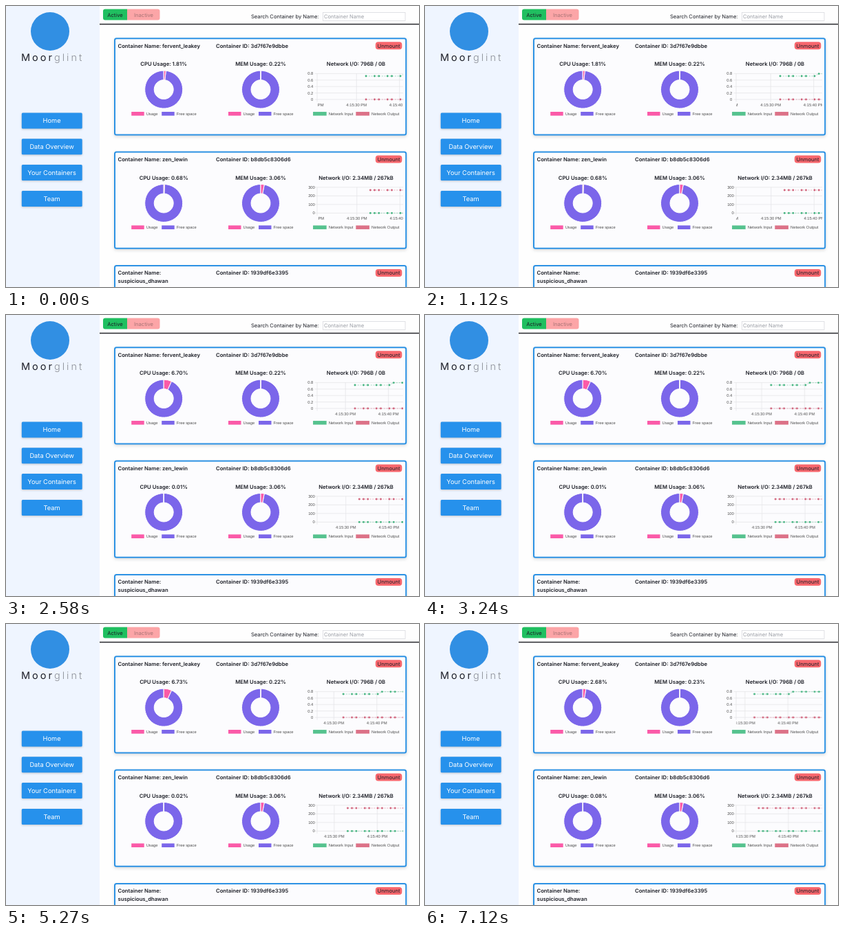
An HTML page that plays this animation: 600x409 px, repeating every 7.18 s.

```html
<!DOCTYPE html>
<html lang="en">
<head>
<meta charset="utf-8">
<title>Container dashboard</title>
<style>
  html, body { margin: 0; width: 100%; height: 100%; overflow: hidden; background: #fefefe; }
  svg { display: block; width: 600px; height: 409px; }
  text { font: 400 7.6px Inter, sans-serif; fill: #1c1e26; text-rendering: geometricPrecision; }
  .mid { text-anchor: middle; }
  .end { text-anchor: end; }
  .bold { font-weight: 600; font-size: 7.7px; }
  .nav { font-size: 9.3px; fill: #fff; text-anchor: middle; }
  .brand { font-size: 14.5px; letter-spacing: 3px; }
  .thin { font-weight: 300; fill: #8d9097; }
  .small { font: 5.8px "Liberation Sans", Arial, sans-serif; fill: #505050; }
  .hint { fill: #9a9da5; }
  .off { fill: #a87476; }
  .button { fill: #2691ec; filter: drop-shadow(0 1px 1.5px #0003); }
  .card { fill: #fcfcfe; stroke: #2c92e4; stroke-width: 2; filter: drop-shadow(0 2px 2px #0002); }
  .grid { stroke: #e3e3e6; stroke-width: .7; fill: none; }
  .slice { stroke: #fff; stroke-width: 1; }
  .line { fill: none; stroke-width: .9; stroke-dasharray: 2 1.8; opacity: .6; }
  .scroll { animation: scroll 7180ms linear infinite; }
  @keyframes scroll { to { transform: translateX(-44.875px); } }
</style>
</head>
<body>
<svg id="stage" viewBox="0 0 600 409">
  <defs>
    <clipPath id="window"><rect x="452.2" y="90" width="124.6" height="60"/></clipPath>
  </defs>
  <rect width="136" height="409" fill="#eff5ff"/>
  <circle cx="64" cy="37" r="28" fill="#318fe3"/>
  <text class="brand" x="22" y="79.5">Moor<tspan class="thin">glint</tspan></text>
  <g id="nav"></g>

  <path d="M136 26.5H600" stroke="#25262b" stroke-width="1.5"/>
  <path d="M176 4.5H144a3 3 0 0 0-3 3V17.5a3 3 0 0 0 3 3H176Z" fill="#20bf60"/>
  <path d="M176 4.5H220.5a3 3 0 0 1 3 3V17.5a3 3 0 0 1-3 3H176Z" fill="#fca5a7"/>
  <text class="mid" x="158.5" y="15.5">Active</text>
  <text class="mid off" x="200" y="15.5">Inactive</text>
  <text x="356" y="18.2">Search Container by Name:</text>
  <rect x="460.5" y="9.5" width="119.5" height="12" fill="#fff" stroke="#d9dadf" stroke-width=".8"/>
  <text class="hint" x="462" y="18.2">Container Name</text>
  <g id="cards"></g>
</svg>
<script>
const LOOP = 7180, PITCH = 165.4;
const PINK = '#fb5aa8', PURPLE = '#7b66ea', GREEN = '#55c28e', RED = '#dc7187';
const byId = id => document.getElementById(id);

function add(parent, tag, attrs = {}, content = '') {
  const el = document.createElementNS('http://www.w3.org/2000/svg', tag);
  for (const key in attrs) el.setAttribute(key, attrs[key]);
  el.textContent = content;
  parent.append(el);
  return el;
}
const label = (parent, x, y, content, cls = '') =>
  add(parent, 'text', { x, y, class: cls }, content);

['Home', 'Data Overview', 'Your Containers', 'Team'].forEach((name, i) => {
  const y = 155.4 + i * 37.85;
  add(byId('nav'), 'rect', { class: 'button', x: 22.8, y, width: 87.9, height: 23, rx: 1.5 });
  label(byId('nav'), 66.6, y + 15, name, 'nav');
});

function makeCard(i, nameLines, id) {
  const card = add(byId('cards'), 'g', { transform: `translate(0 ${i * PITCH})` });
  add(card, 'rect', { class: 'card', x: 158, y: 47.2, width: 423.2, height: 140.2, rx: 2.5 });
  nameLines.forEach((line, n) => label(card, 162.5, 60.7 + n * 11.7, line, 'bold'));
  label(card, 305, 60.7, 'Container ID: ' + id, 'bold');
  add(card, 'rect', { x: 536.8, y: 52.2, width: 38.5, height: 11, rx: 4, fill: '#f7676d' });
  label(card, 556, 60.6, 'Unmount', 'mid');
  return card;
}

function legend(card, x, width, color, name) {
  add(card, 'rect', { x, y: 154, width, height: 5.6, fill: color });
  label(card, x + width + 3, 158.8, name, 'small');
}

function slicePath(cx, from, to) {
  const at = (r, turn) => {
    const a = turn * 2 * Math.PI;
    return `${cx + r * Math.sin(a)} ${121.6 - r * Math.cos(a)}`;
  };
  const big = to - from > .5 ? 1 : 0;
  return `M${at(27.5, from)}A27.5 27.5 0 ${big} 1 ${at(27.5, to)}` +
         `L${at(14, to)}A14 14 0 ${big} 0 ${at(14, from)}Z`;
}

// steps: [time, percent] pairs; each change eases in over one second
function makeGauge(card, cx, name, steps) {
  const title = label(card, cx, 87.2, '', 'mid bold');
  const free = add(card, 'path', { class: 'slice', fill: PURPLE });
  const used = add(card, 'path', { class: 'slice', fill: PINK });
  legend(card, cx - 47, 18.5, PINK, 'Usage');
  legend(card, cx - 3, 18.5, PURPLE, 'Free space');
  return t => {
    const k = steps.findLastIndex(step => t >= step[0]);
    const [since, value] = steps[k];
    const before = k ? steps[k - 1][1] : value;
    const left = Math.max(0, 1 - (t - since) / 1000);
    const share = (value + (before - value) * left ** 4) / 100;
    title.textContent = `${name} Usage: ${value.toFixed(2)}%`;
    used.setAttribute('d', slicePath(cx, 0, share));
    free.setAttribute('d', slicePath(cx, share, 1));
  };
}

function makeNetwork(card, { title, ticks, labelX, tickX, first, input, output }) {
  label(card, 508.5, 87.2, 'Network I/O: ' + title, 'mid bold');
  const gap = 37.6 / (ticks.length - 1);
  ticks.forEach((tick, i) => {
    const y = 98.4 + i * gap;
    add(card, 'path', { class: 'grid', d: `M448.5 ${y}H577` });
    label(card, labelX, y + 2, tick, 'small end');
  });
  add(card, 'path', { class: 'grid', d: 'M452 98.4V139.5' });

  const view = add(card, 'g', { 'clip-path': 'url(#window)' });
  const scroll = add(view, 'g', { class: 'scroll' });
  [20, 30, 40].forEach((sec, i) => {
    const x = tickX + (i - 1) * 62.5;
    add(scroll, 'path', { class: 'grid', d: `M${x} 98.4V139.5` });
    label(scroll, x, 146, `4:15:${sec} PM`, 'small mid');
  });

  // samples arrive alternately two seconds and one second apart
  const pointX = k => 523 + 18.75 * (k >> 1) + (k % 2 ? 12.5 : 0);
  const series = (levelAt, color, dot) => {
    const points = [];
    for (let k = 0; k < 12; k++)
      points.push([pointX(k) + (k ? 0 : first), levelAt(k)]);
    add(scroll, 'polyline', { class: 'line', stroke: color, points: points.join(' ') });
    for (const [cx, cy] of points) add(scroll, 'circle', { cx, cy, r: 1.4, fill: dot });
  };
  series(output, RED, '#d0637b');
  series(input, GREEN, '#41b27d');

  [[446, GREEN, 'Network Input'], [508.3, RED, 'Network Output']].forEach(([x, color, name]) => {
    legend(card, x, 19.7, color, name);
    add(card, 'rect', { x: x + .4, y: 154.3, width: 19, height: 5, fill: 'none',
      stroke: '#fff', 'stroke-opacity': .25, 'stroke-width': .7, 'stroke-dasharray': '1 1.5' });
  });
}

const top1 = makeCard(0, ['Container Name: fervent_leakey'], '3d7f67e9dbbe');
const top2 = makeCard(1, ['Container Name: zen_lewin'], 'b8db5c8306d6');
makeCard(2, ['Container Name:', 'suspicious_dhawan'], '1939df6e3395');

const gauges = [
  makeGauge(top1, 229.2, 'CPU', [[0, 1.81], [1300, 6.66], [2300, 6.7], [4300, 6.73], [5350, 2.68]]),
  makeGauge(top1, 370, 'MEM', [[0, .22], [5350, .23]]),
  makeGauge(top2, 229.2, 'CPU', [[0, .68], [1300, .12], [2300, .01], [4300, .02], [5350, .08]]),
  makeGauge(top2, 370, 'MEM', [[0, 3.06]])
];

makeNetwork(top1, {
  title: '796B / 0B', ticks: ['0.8', '0.6', '0.4', '0.2', '0'], labelX: 446.3, tickX: 509.2,
  first: 0, input: k => k < 6 ? 102 : 98.6, output: () => 136
});
makeNetwork(top2, {
  title: '2.34MB / 267kB', ticks: ['300', '200', '100', '0'], labelX: 448.8, tickX: 509.8,
  first: 6.3, input: () => 136, output: () => 102.6
});

let start;
function frame(now) {
  start ??= now;
  const t = (now - start) % LOOP;
  gauges.forEach(draw => draw(t));
  requestAnimationFrame(frame);
}
gauges.forEach(draw => draw(0));
requestAnimationFrame(frame);
</script>
</body>
</html>
```
